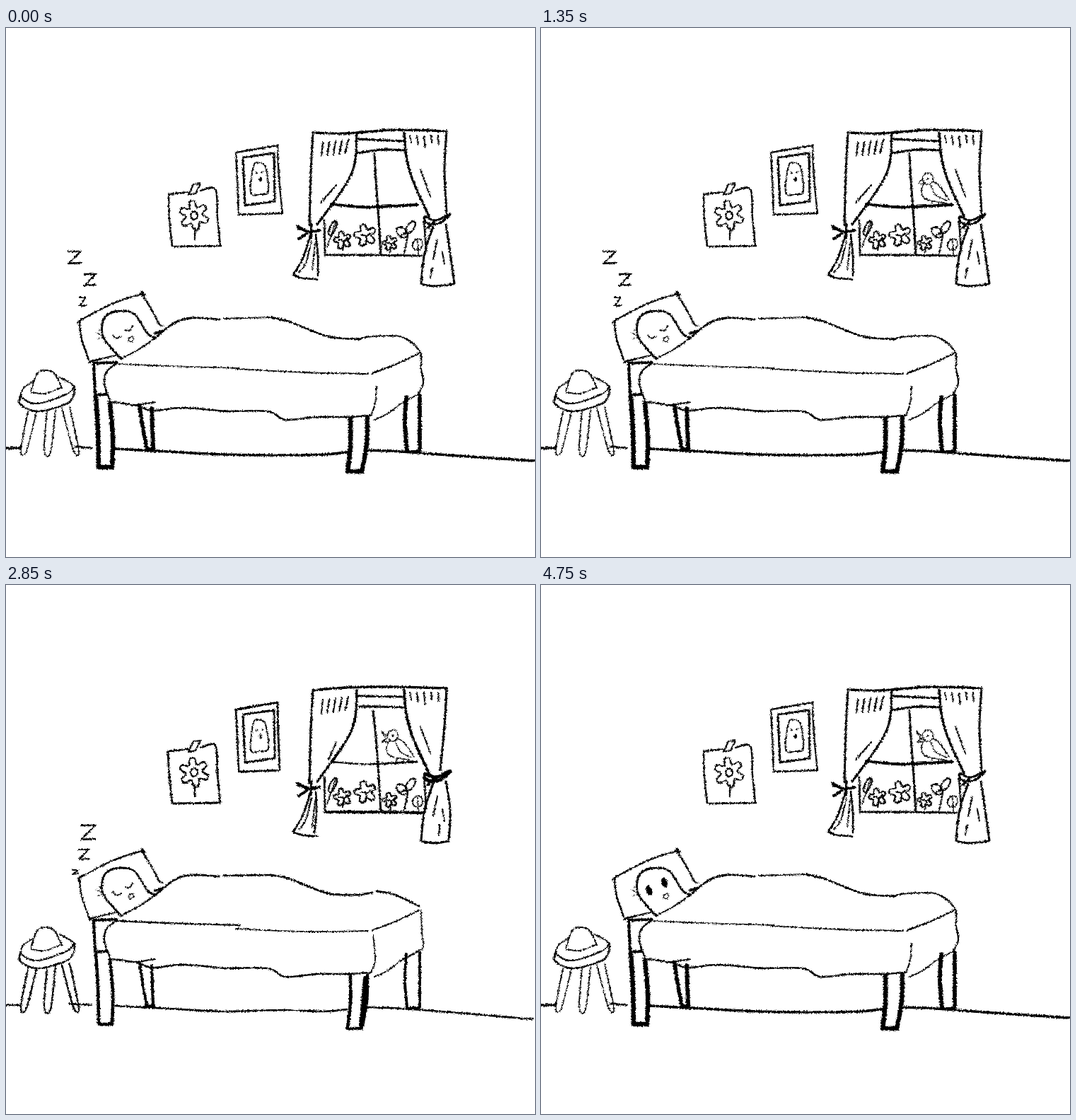
Animation, 748 px wide and 748 px high, one loop 4900 ms. Source, as an HTML page:

```html
<!DOCTYPE html>
<html>
<head>
<meta charset="utf-8">
<style>
html, body { margin: 0; width: 100%; height: 100%; overflow: hidden; background: #fff }
svg { display: block; width: 100vw; height: 100vh }
path { stroke: #000; stroke-linecap: round; stroke-linejoin: round }
</style>
</head>
<body>
<svg viewBox="0 0 748 748">
  <filter id="chalk" x="0" y="0" width="748" height="748" filterUnits="userSpaceOnUse" color-interpolation-filters="sRGB">
    <feTurbulence id="grain" type="fractalNoise" baseFrequency=".45" numOctaves="2"/>
    <feDisplacementMap in="SourceGraphic" scale="4" xChannelSelector="R" yChannelSelector="G"/>
  </filter>
  <clipPath id="pane"><path d="M490 140H562L566 182 575 215 598 270H490z"/></clipPath>
  <g id="art" filter="url(#chalk)"></g>
</svg>
<script>
const art = document.getElementById('art'), grain = document.getElementById('grain');
let take = 0, out = '';           // which of the three redrawn takes is being inked

const pick = (...options) => options[take];

function add(d, width, fill = 'none') {
  out += `<path d="${d}" fill="${fill}" stroke-width="${width}"/>`;
}

function spline(p, closed) {
  const n = p.length;
  const at = i => closed ? p[(i + n) % n] : p[Math.max(0, Math.min(n - 1, i))];
  const slope = (i, k) => at(i)[2] ? 0 : (at(i + 1)[k] - at(i - 1)[k]) / 6;
  let d = 'M' + p[0].slice(0, 2);
  for (let i = 0; i < n - !closed; i++) {
    const a = at(i), b = at(i + 1);
    d += 'C' + [a[0] + slope(i, 0), a[1] + slope(i, 1), b[0] - slope(i + 1, 0), b[1] - slope(i + 1, 1), b[0], b[1]].map(v => v.toFixed(1));
  }
  return d;
}

// Smooth line; "!" marks a corner, "a/b/c" gives one value per take
function pen(width, text, closed) {
  const value = s => { const o = s.split('/'); return +(o[take] ?? o[0]); };
  const p = text.split(' ').map(t => [...t.replace('!', '').split(',').map(value), t.includes('!')]);
  add(spline(p, closed), width);
}

const ring = (n, at) => spline(Array.from({ length: n }, (_, i) => at(i * 2 * Math.PI / n, i)), true);

function oval(width, x, y, rx, ry, deg = 0, fill) {
  const t = deg * Math.PI / 180;
  add(ring(10, a => {
    const u = rx * Math.cos(a), v = ry * Math.sin(a);
    return [x + u * Math.cos(t) - v * Math.sin(t), y + u * Math.sin(t) + v * Math.cos(t)];
  }), width, fill);
}

const dot = (x, y, rx, ry = rx, deg = 0) => oval(.5, x, y, rx, ry, deg, '#000');

function bloom(width, x, y, r, petals) {
  add(ring(3 * petals, (a, i) => {
    const k = i % 3 ? r : r * .58;
    return [x + k * Math.cos(a - 1.2), y + k * Math.sin(a - 1.2)];
  }), width);
}

function curtains() {
  const w = pick(3, 3.2, 3.1);
  pen(w + .4, '434,148/149/155 482,149/145/151 550,144/144/149 623,146/146/149');
  pen(w, '434,148/149/155 431,205 429,280');
  pen(w + .2, '496,149 493,192 478,225 440,278');
  pen(w, '623,146/146/150 620,200 623/614/624,262');
  pen(w + .4, '563,148 566,182 575,215 598,266');
  for (let i = 0; i < 5; i++) {
    pen(2.2, `${448 + 9 * i},${162 - i} ${446 + 8.4 * i},${181 - i}`);
    pen(2.2, `${571 + 10 * i},152 ${573 + 9.7 * i},${162 + i % 3 * 3}`);
  }
  pen(2, '467,222 445/456/443,247');
  pen(2, '586,200 600,238');
  if (take == 2) pen(2, '605,223 604,250');

  pen(4, '412,280 427,288 443,286');
  pen(4, '414,298 427,288 413,283');
  pen(3.4, '432,277 431,297');
  pen(2.7, '430,294 420,325 406,349! 420,354 440,355');
  pen(2.7, '438,292 441/439/442,322 441/436/442,350');
  pen(2, '432,301 424,332 415,345');
  pen(1.7, '437,305 433,343');

  if (take == 2) {
    oval(3.2, 616, 268, 13, 6, -22);
    oval(3.4, 592, 272, 7, 6);
  } else {
    pen(pick(3.2, 4.8), '592,267 608,272 628,263 613,276 596,276', true);
  }
  pen(3.2, '596,283 606,273');
  pen(3, '604,281 592,318 587,362! 605,365 634/626/633,362! 628,318 622,278');
  pen(2, '610,299 604,327');
  pen(2, '617,317 620,334');
  pen(2, '603/613/602,339 600/612/600,353');
}

function pane() {
  pen(3.2, '498,157 561,160/158/160');
  pen(3.2, '496/500/503,177/172/175 530,172 563,173');
  pen(3, '521/519/519,178 523,215 526,255 530,321');
  pen(pick(4, 2.4, 2.8), '460,249/250/251 500,253 525,253');
  pen(pick(4, 3.2, 2.8), '525,253 581,250/250/252');
  pen(2.6, '450,272 451,318');
  pen(pick(2.9, 4, 2.9), '451,321 515,321 588,322');
  pen(2.6, '591,268 594,316');
}

function garden() {
  const beds = [[476, 300, 12], [508, 293, 15], [543, 304, 10]];
  for (const [x, y, r] of beds) {
    bloom(2.4, x, y, r, 5);
    pen(2, `${x - 6},${y} ${x + 2},${y + 2} ${x},${y + 14}`);
    pen(2, `${x + 7},${y - 3} ${x + 1},${y + 3}`);
  }
  oval(2.4, 462, 283, 4, 11, 25);
  pen(1.5, '466,275 454,310');
  oval(2.2, 560, 289, 9, 6, 40);
  oval(2.2, 572, 282, 5, 10, 35);
  pen(2.2, '558,293 568,292 563,318');
  oval(1.8, 582, 306, 7, 8, 20);
  pen(1.5, '582,300 583,320');
}

function pictures() {
  const w = pick(2.4, 2.8, 2.8);
  pen(w, '325,176! 384,166/166/169! 386/385/388,212 391/387/392,262! 329,264! 327,215 325,176!', true);
  pen(3, '335,183! 379,177! 380,245! 338,251!', true);
  pen(1.9, '346,233 350,195 358,191 367,197 371,231 359,235', true);
  dot(354, 205, 1.2);
  dot(362, 204, 1.2);
  dot(360, 214, 2, 3.5);

  pen(w, '230/229/231,235 231,270 235,308');
  pen(w, '236,309 304/302/301,308');
  pen(w, '230,235 258,232');
  pen(w, '275,230 296,228/227/231 299,268 303,307');
  pen(2.2, '258,236! 265,221! 275,220! 268,234!', true);
  bloom(pick(2.2, 2.4, 3), 266, 265, 20, pick(6, 6, 7));
  oval(pick(2, 2.2, 3.2), 266, 265, 5, 5.5);
  pen(2.4, '267,283 267,299');
}

function sleeper() {
  pen(2.4, '118,472 107,440 104,414! 150,390 192,376! 205,397 217,419');
  pen(2.2, '118,472 138,467 158,462');
  pen(3, '102,416 108,411');
  pen(3, '118,473 123,470');
  pen(3, '192,373 196,378');
  pen(3.2, '211,432 222,428');
  pen(2, '217,420 222,421');
  pen(2.8, '163,468 139,440 136,420 144,405 163,400 182,405 200,432 212,438');
  pen(2.2, '164,467 190,453 214,436');
  pen(1, '127,431 136,435');
  pen(1, '129,440 137,436 132,426');
}

function blanket() {
  pen(2.8, '215,435 238,417/417/416 262,410 302,412');
  pen(pick(1.8, 2.4, 2.4), '308,411 374,409/410/407');
  pen(2.8, '374,409/410/407 400,415 455,436 500,440/438/439');
  if (take == 1) {
    pen(2.8, '500,438 518,435');
    pen(2.8, '524,433 550,438 584,454');
    pen(1.8, '587,460 588,490 590,512 580,518');
  } else {
    pen(2.2, '500,439 520,436 560,437/437/436 585,457 587,482 590,502 583,518');
  }
  pen(pick(1.6, 2.4, 2.8), '158,475 230,478 330,481');
  pen(pick(1.8, 1.8, 3), '325,482/486/482 420,487/490/488 512,489');
  pen(2, '518,488 550,476 584,460');
  pen(1.8, '524/519/525,507/494/508 522,530 516,548');
  pen(2, '521,554 540,545 560,530 583,518');
  pen(2.4, '157,474 143,485 139,503 148,529');
  pen(2.4, '148,529 162,530 182,533 210,529');
  pen(2.5, '184,533 208,541 250,537 310,542');
  pen(2.5, '310,542 370,542 395,554 440,550 482,550 515,548');
}

function bed() {
  const w = pick(6.5, 4.6, 5);
  pen(4.2, '124,475 126,518');
  pen(4, '124,474 157,473');
  pen(4, '126,519 142,518');
  pen(w, '127,520 130,570 131,621! 150,621! 151,578 147,530');
  pen(w - 1, '189,535 194,568 199,594');
  pen(w - .5, '206,538 208,594');
  pen(4, '197,596 210,595');
  pen(w, '487,553 487,590 483,627! 503,627! 510,588 511,552');
  if (take == 1) pen(6, '508,556 502,622');
  pen(w - .7, '566,522 564,560 567,596');
  pen(w - .8, '585,520 585,597');
  pen(pick(2, 4, 4), '566,598 583,598');
}

function stool() {
  pen(2, '35,514 44,489 57,484 69,489 79,509');
  pen(1.8, '36,515 55,517 79,508');
  pen(2, '38,500 24,510 23,523 45,531 85,518 95,506 76,494');
  pen(2.4, '21,518 20,532 45,542 84,532 95,521 97,507');
  const w = pick(1.7, 2.4, 2.2);
  pen(w, '31,542 21,597 29,598 43,543');
  pen(w, '58,542 54,597 63,600 70,540');
  pen(w, '79,537 95,596 103,598 90,536');
}

function floor() {
  const w = pick(3.6, 2.7, 3.6);
  pen(w, '0,594 20,594');
  pen(w - .4, '98/90/70,592 121,594');
  if (take == 2) pen(w - .4, '32,594 55,595');
  pen(w, '154,595 230,599 310,603 390,604/601/605 450,603 482,600');
  pen(w, '512,597 560,599 640,605 748/745/748,612/614/612');
}

function face(step) {
  if (step < 24) {
    pen(1.8, '151,434 156,439 163,436');
    pen(1.8, '169,427 175,428 179,421');
  } else if (blinks.includes(step)) {
    pen(2, '151,434 161,430');
    pen(2, '169,424 179,419');
  } else {
    dot(153, 432, 4, 7, -18);
    dot(174.5, 421, 4, 7, -18);
  }
  oval(1.6, 177, 440, 3, 4, 50);
}

function peekingBird() {
  pen(1.4, '570,196 561,198 558,205 561,213 569,215');
  pen(1.4, '558,202 552,206 558,209');
  dot(565, 203, 1);
  pen(1.4, '569,219 568,222');
  pen(1.4, '573,221 570,227');
}

function perchedBird(singing) {
  oval(1.5, 547, 213, 7.5, 8);
  dot(547, 213, 1.3);
  pen(1.5, '554,217 563,223 577,243');
  pen(1.5, '541,221 538,231 544,242 574,248');
  pen(1.3, '551,222 558,236 574,244');
  pen(1.3, '554,245 551,250');
  pen(1.3, '563,246 562,251 569,249');
  if (singing) {
    pen(1.5, '539,214 531,207 538,218');
    pen(1.5, '539,216 532,222 543,221');
  } else {
    pen(1.5, '540,213 534,220 542,220');
  }
}

function bird(step) {
  if (step < 4) return;
  const dx = { 4: 8, 7: 9 }[step] || 0;
  out += `<g clip-path="url(#pane)"><g transform="translate(${dx} ${-dx / 2})">`;
  if (step < 7) peekingBird();
  else perchedBird(step > 16);
  out += '</g></g>';
}

function zed(width, l, t, r, b) {
  pen(width, `${l},${t}! ${r},${t}! ${l},${b}! ${r},${b - 1}!`);
}

function snore(step) {
  if (step > 25) return;
  if (step < 17) zed(2.3, pick(88, 82, 75), pick(316, 309, 306), pick(106, 100, 100), pick(333, 331, 328));
  zed(2.3, pick(111, 106, 105), pick(348, 340, 338), pick(127, 126, 124), pick(364, 360, 356));
  zed(2.1, pick(104, 103, 97), pick(381, 374, 369), pick(113, 117, 116), pick(393, 388, 386));
  if (take) zed(1.8, 94, pick(0, 403, 398), 102, pick(0, 409, 404));
}

const blinks = [24, 25, 29, 30];
const hold = step => blinks.includes(step) ? 100 : 150;
const room = [curtains, pane, garden, pictures, sleeper, blanket, bed, stool, floor];

function show(step) {
  take = step % 3;
  out = '';
  for (const part of [...room, face, bird, snore]) part(step);
  grain.setAttribute('seed', take + 2);
  art.innerHTML = out;
}

let shown = -1;

function tick() {
  let t = performance.now() % 4900, step = 0;
  while (t >= hold(step)) t -= hold(step++);
  if (step != shown) show(shown = step);
  requestAnimationFrame(tick);
}
tick();
</script>
</body>
</html>
```
